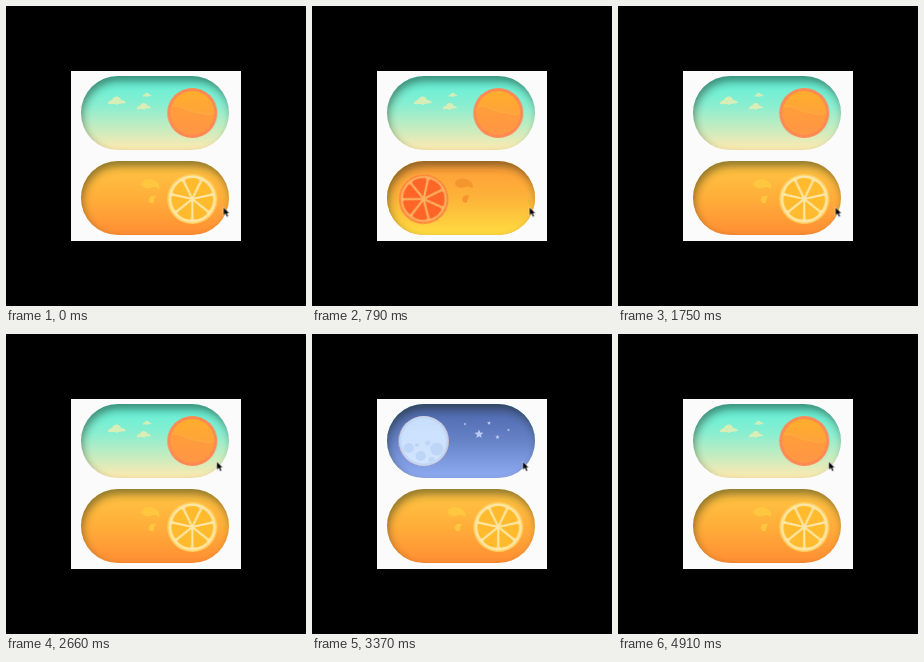
These frames come from a looping animation (300x300 px, 5.01 s). An HTML page:

```html
<!DOCTYPE html>
<html lang="en">
<head>
<meta charset="utf-8">
<title>Toggle switches</title>
<style>
html, body { margin: 0; width: 100%; height: 100%; overflow: hidden; background: #000; }
svg { display: block; width: 100%; height: 100%; }

.alt, .knob, .roll, .cursor { animation: 5010ms ease-in-out infinite; }
.roll { transform-origin: 0 0; }
.sky .alt { animation-name: sky-fade; }
.sky .knob { animation-name: sky-slide; }
.fruit .alt { animation-name: fruit-fade; }
.fruit .knob { animation-name: fruit-slide; }
.roll { animation-name: fruit-roll; }
.cursor { animation-name: point; }

/* Fruit: 200-520 ms and 1250-1570 ms. Sky: 2800-3120 ms and 4543-4863 ms. */
@keyframes fruit-fade {
  0%, 3.992%, 31.337%, 100% { opacity: 0; }
  10.379%, 24.95% { opacity: 1; }
}
@keyframes fruit-slide {
  0%, 3.992%, 31.337%, 100% { transform: translate(186.3px, 193px); }
  10.379%, 24.95% { transform: translate(111.7px, 193px); }
}
@keyframes fruit-roll {
  0%, 3.992%, 31.337%, 100% { transform: rotate(0deg); }
  10.379%, 24.95% { transform: rotate(-168deg); }
}
@keyframes sky-fade {
  0%, 55.888%, 97.066%, 100% { opacity: 0; }
  62.275%, 90.679% { opacity: 1; }
}
@keyframes sky-slide {
  0%, 55.888%, 97.066%, 100% { transform: translate(186.3px, 107px); }
  62.275%, 90.679% { transform: translate(111.7px, 107px); }
}
@keyframes point {
  0%, 39.92% { transform: translate(217.4px, 201.3px); }
  49.9%, 100% { transform: translate(210.7px, 127.6px); }
}
</style>
</head>
<body>
<svg viewBox="0 0 300 300" xmlns="http://www.w3.org/2000/svg">
  <defs>
    <linearGradient id="day" x2="0" y2="1">
      <stop stop-color="#5cf0d8"/><stop offset=".4" stop-color="#8aeed0"/><stop offset="1" stop-color="#ffeab0"/>
    </linearGradient>
    <linearGradient id="night" x2="0" y2="1">
      <stop stop-color="#4a64a8"/><stop offset=".5" stop-color="#6783c8"/><stop offset="1" stop-color="#8fabf2"/>
    </linearGradient>
    <linearGradient id="orange" x2="0" y2="1">
      <stop stop-color="#ffc643"/><stop offset=".5" stop-color="#ffae3a"/><stop offset="1" stop-color="#ff8e33"/>
    </linearGradient>
    <linearGradient id="yellow" x2="0" y2="1">
      <stop stop-color="#ff9c38"/><stop offset=".5" stop-color="#fdb339"/><stop offset="1" stop-color="#ffdc40"/>
    </linearGradient>
    <linearGradient id="sun" x2="0" y2="1">
      <stop stop-color="#ffae2b"/><stop offset="1" stop-color="#ff984c"/>
    </linearGradient>
    <linearGradient id="moon" x2="0" y2="1">
      <stop stop-color="#c8dffc"/><stop offset="1" stop-color="#d3e5ff"/>
    </linearGradient>
    <filter id="blur" x="-20%" y="-30%" width="140%" height="160%"><feGaussianBlur stdDeviation="4"/></filter>
    <rect id="pill" x="75" y="70" width="148" height="74" rx="37"/>
    <clipPath id="pill-clip"><use href="#pill"/></clipPath>
    <clipPath id="disc-clip"><circle r="22"/></clipPath>
    <g id="shade" clip-path="url(#pill-clip)">
      <rect x="70" y="69" width="162" height="86" rx="43" fill="none" stroke="#1b2616" stroke-width="12" opacity=".52" filter="url(#blur)"/>
    </g>
    <path id="cloud" d="M-9 3C-9 0-6-1-5-1C-4-4 0-6 3-3C4-2 4-1 4-1C7-1 9 1 9 2C5 3 2 2 0 4C-3 2-6 4-9 3Z"/>
    <path id="star" d="M0-5L1.4-1.6L5-1.4L2.2 1L3 4.5L0 2.6L-3 4.5L-2.2 1L-5-1.4L-1.4-1.6Z"/>
    <g id="drops">
      <path d="M136 176C139 172 147 172 151 176C153 178 154 180 153 183C150 180 147 181 144 182C139 183 134 180 136 176Z"/>
      <path d="M150 190C146 189 142 191 143 195C144 198 148 198 148 195C148 193 149 192 150 190Z"/>
    </g>
    <path id="segment" d="M0-2.4L7.2-17.6Q8-19.4 6-20Q0-21.8-6-20Q-8-19.4-7.2-17.6Z"/>
    <g id="segments"></g>
  </defs>

  <rect width="300" height="300"/>
  <rect x="65" y="65" width="170" height="170" fill="#fbfbfb"/>

  <g class="sky">
    <use href="#pill" fill="url(#day)"/>
    <g fill="#f3eeae" opacity=".75">
      <use href="#cloud" x="111" y="95"/>
      <use href="#cloud" transform="translate(141 89) scale(.5)"/>
      <use href="#cloud" transform="translate(138 100.5) scale(.8)"/>
    </g>
    <g class="alt">
      <use href="#pill" fill="url(#night)"/>
      <g fill="#b8c9f3">
        <use href="#star" transform="translate(167 100) scale(.9)"/>
        <use href="#star" transform="translate(177 89) scale(.4)"/>
        <use href="#star" transform="translate(185.5 103) scale(.45)"/>
        <use href="#star" transform="translate(153 90) scale(.3)"/>
        <use href="#star" transform="translate(196.5 96) scale(.3)"/>
      </g>
    </g>
    <use href="#shade"/>
    <g class="knob">
      <circle r="25" fill="#ff8853"/>
      <circle r="22" fill="url(#sun)"/>
      <g clip-path="url(#disc-clip)">
        <path d="M-24-3C-15-12-8-2 2-1S15 4 24-1V24H-24Z" fill="#ff963f" opacity=".5"/>
        <path d="M-24-3C-15-12-8-2 2-1S15 4 24-1" fill="none" stroke="#ffb348" opacity=".6"/>
      </g>
      <g class="alt">
        <circle r="25" fill="#bfd7f8"/>
        <circle r="22.5" fill="url(#moon)"/>
        <g clip-path="url(#disc-clip)" fill="#bdd5f6">
          <circle cx="-15" cy="7" r="5"/>
          <circle cx="13" cy="8" r="6.5"/>
          <circle cx="-3" cy="15" r="5"/>
          <circle cx="4" cy="2" r="2.5"/>
          <circle cx="-7" cy="4" r="2"/>
          <circle cx="8" cy="19" r="3"/>
        </g>
      </g>
    </g>
  </g>

  <g class="fruit">
    <use href="#pill" y="85" fill="url(#orange)"/>
    <use href="#drops" fill="#ffc640"/>
    <g class="alt">
      <use href="#pill" y="85" fill="url(#yellow)"/>
      <use href="#drops" x="7.5" y="-.5" fill="#f5952f"/>
    </g>
    <use href="#shade" y="85"/>
    <g class="knob">
      <g class="roll">
        <circle r="25" fill="#ffcf62"/>
        <circle r="23.5" fill="#ffe6a2"/>
        <use href="#segments" fill="#ffbb2d"/>
        <g class="alt">
          <circle r="25" fill="#ff8636"/>
          <circle r="23" fill="#ffb060"/>
          <use href="#segments" fill="#ff6526"/>
        </g>
      </g>
    </g>
  </g>

  <path class="cursor" d="M0 0V8.2L2 6.5L3.4 9.6L5 8.9L3.7 6H6.2Z" fill="#000" stroke="#fff" stroke-width=".5"/>
</svg>
<script>
const segments = document.getElementById('segments');
const sliceCount = 7;
for (let i = 0; i < sliceCount; i++) {
  const slice = document.createElementNS('http://www.w3.org/2000/svg', 'use');
  slice.setAttribute('href', '#segment');
  slice.setAttribute('transform', `rotate(${i * 360 / sliceCount})`);
  segments.append(slice);
}
</script>
</body>
</html>
```
